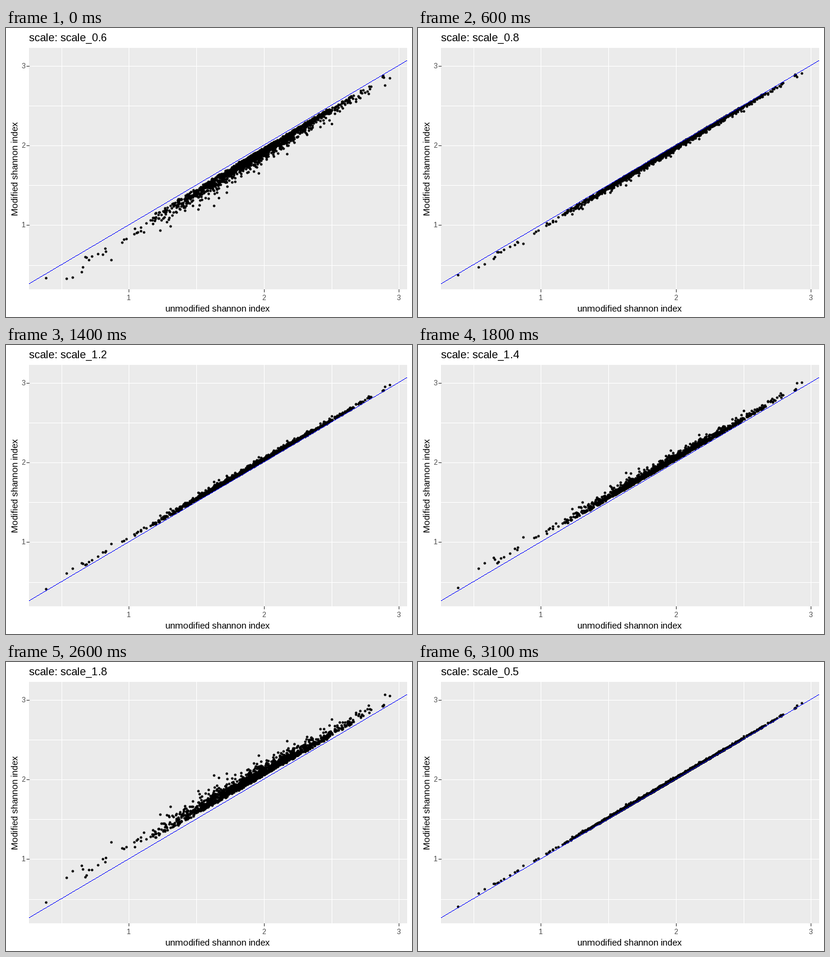
A matplotlib script that plays this animation: 672 by 480 pixels, repeating every 3200 ms.

```python
import numpy as np
import matplotlib.pyplot as plt
from matplotlib.animation import FuncAnimation
from matplotlib.patches import Rectangle

plt.rcParams.update({
    "font.family": "Liberation Sans",
    "text.hinting": "force_autohint",
    "text.hinting_factor": 1,
    "toolbar": "None",
})

W, H, DPI = 672, 480, 96
PT = 72 / DPI  # points per pixel
FRAMES, STEP = 32, 100
LEFT, RIGHT, TOP, BOTTOM = 38, 664, 33, 434
X1, UX = 202.9, 223.4  # pixel of value 1 and pixels per unit
Y1, UY = 326.9, 132.4

# Lone points that stand out: unmodified index, offset at scale 1.8.
KEY_POINTS = [(0.39, 0.06), (0.54, 0.225), (0.587, 0.255), (0.655, 0.255),
              (0.875, 0.33), (1.31, 0.34), (1.635, 0.41), (1.73, 0.335),
              (2.505, 0.245), (2.902, 0.155), (2.937, 0.105)]


def px(v):
    return X1 + UX * (v - 1)


def py(v):
    return Y1 - UY * (v - 1)


def shift_at(scale):
    """Distance from the diagonal relative to scale 1.8."""
    return (scale ** 0.3 - 1) / (1.8 ** 0.3 - 1)


def make_points(n=1450):
    rng = np.random.default_rng(7)
    x = rng.normal(1.95, 0.34, 2 * n)
    x = x[(x > 1.09) & (x < 2.67)][:n]
    d = 0.052 - 0.02 * (x - 1.1)
    d += (0.042 - 0.014 * (x - 1)) * rng.gamma(2.2, size=len(x))
    low = rng.uniform((0.66, 0.08), (1.08, 0.22), (16, 2))
    high = rng.uniform((2.6, 0.03), (2.8, 0.15), (20, 2))
    top = rng.uniform((2.88, 0.015), (2.9, 0.05), (3, 2))
    return np.vstack([KEY_POINTS, low, high, top, np.column_stack([x, d])]).T


fig = plt.figure(figsize=(W / DPI, H / DPI), dpi=DPI, facecolor="white")
ax = fig.add_axes([0, 0, 1, 1])
ax.set(xlim=(0, W), ylim=(H, 0))
ax.axis("off")


def rule(xs, ys, color):
    ax.plot(xs, ys, color=color, lw=PT, aa=False, zorder=1,
            solid_capstyle="butt")


def label(x, y, text, size, color="black", ha="center", **kw):
    return ax.text(x, y, text, fontsize=size * PT, color=color, ha=ha,
                   va="baseline", **kw)


ax.add_patch(Rectangle((LEFT, TOP), RIGHT - LEFT, BOTTOM - TOP,
                       fc="#EBEBEB", ec="none", aa=False, zorder=0))

for v in np.arange(0.5, 3.1, 0.5):
    gx, gy = int(px(v)) + 0.5, int(py(v)) + 0.5
    rule([gx, gx], [TOP, BOTTOM], "white")
    rule([LEFT, RIGHT], [gy, gy], "white")
    if v == int(v):
        rule([gx, gx], [BOTTOM, BOTTOM + 4], "#333333")
        rule([LEFT - 4, LEFT], [gy, gy], "#333333")
        label(gx, 452, f"{v:.0f}", 12, "#4D4D4D")
        label(32, gy + 4.5, f"{v:.0f}", 12, "#4D4D4D", ha="right")

# Diagonal as a one-pixel staircase.
cols = np.arange(LEFT, RIGHT + 1)
rows = np.floor(py(1 + (cols - X1) / UX))
ax.fill_between(cols, rows, rows + 1, step="post", fc="blue", lw=0, aa=False,
                zorder=4)

label(351, 471, "unmodified shannon index", 14.6)
label(20, 233, "Modified shannon index", 14.6, rotation=90,
      rotation_mode="anchor")
title = label(LEFT, 22, "", 18, ha="left")

base, offset = make_points()
dots, = ax.plot([], [], "o", ms=4.2 * PT, mfc="black", mec="none", aa=False,
                zorder=3)


def draw(i):
    last = i == FRAMES - 1
    if last:  # halfway from the highest scale back to the lowest
        shift = (shift_at(2) + shift_at(0.5)) / 2
    else:
        shift = shift_at(0.5 + 0.05 * i)
    dots.set_data(np.floor(px(base)), np.floor(py(base + shift * offset)))
    scale = 0.5 if last else 0.6 + 0.2 * (i // 4)
    title.set_text(f"scale: scale_{round(scale, 1):g}")
    return dots, title


anim = FuncAnimation(fig, draw, frames=FRAMES, interval=STEP, repeat=True,
                     repeat_delay=0, init_func=lambda: draw(0))
plt.show()
```
